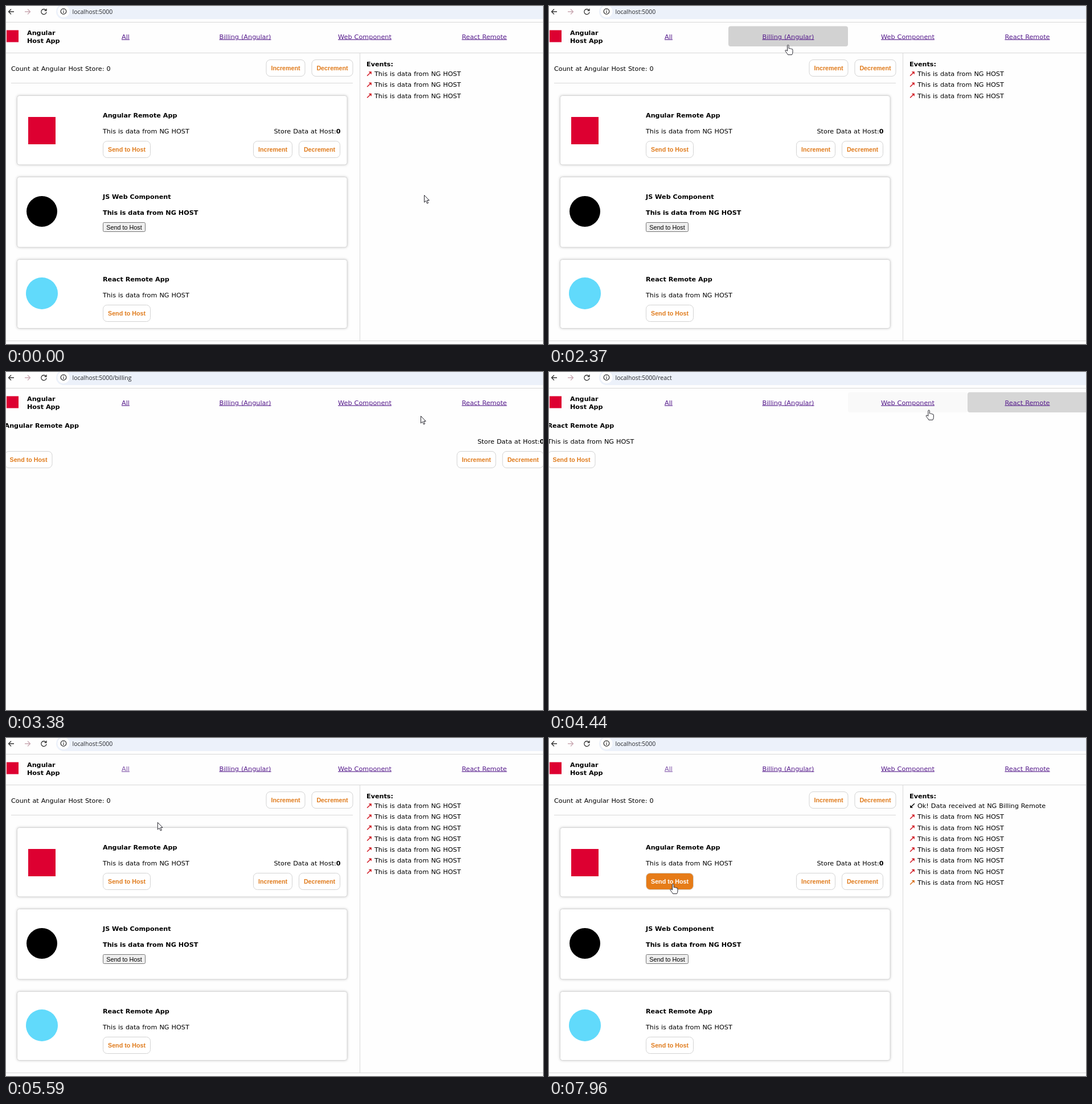
An HTML page for the animation above (8 s loop, 943x594 px).

```html
<!DOCTYPE html>
<html lang="en">
<head>
<meta charset="utf-8">
<title>Host App</title>
<style>
html, body { margin: 0; width: 100%; height: 100%; overflow: hidden; background: #fefefe; }
svg { display: block; width: 943px; height: 594px; }
text { font: 11.25px "DejaVu Sans", sans-serif; word-spacing: .4px; fill: #000; white-space: pre; }
.b { font-weight: bold; font-size: 11.2px; word-spacing: 0; }
.btn { font: bold 10.7px "Liberation Sans", Arial, sans-serif; word-spacing: 0; fill: #e07b1c; text-anchor: middle; }
.plain { font: 10.8px "Liberation Sans", Arial, sans-serif; word-spacing: 0; text-anchor: middle; }
.url { font: 10.5px "Open Sans", sans-serif; word-spacing: 0; fill: #27292d; }
.link { fill: #551a8b; text-anchor: middle; text-decoration: underline; }
.end { text-anchor: end; }
.line { stroke: #d8d8d8; fill: none; }
.icon { fill: none; stroke: #333; stroke-width: 1.3; }
.card { fill: #fff; stroke: #d6d6d6; filter: drop-shadow(0 0 2px rgba(0,0,0,.2)); }
</style>
</head>
<body>
<svg id="stage" viewBox="0 0 943 594" xmlns="http://www.w3.org/2000/svg"></svg>
<script>
const LOOP = 8000;
const FADE = { link: 280, send: 560 };
const CLICK = { billing: 2520, react: 3960, all: 5170, send: 7960 };
const DATA = 'This is data from NG HOST';
const LINKS = ['All', 'Billing (Angular)', 'Web Component', 'React Remote'];
const NAV = { x: 105, y: 35.5, w: 210, h: 35.5 };
const SEND = { x: 170.5, y: 237.5, w: 83, h: 29 };

const text = (x, y, s, cls = '', more = '') =>
  `<text x="${x}" y="${y}" class="${cls}" ${more}>${s}</text>`;
const line = d => `<path class="line" d="${d}"/>`;
const group = (id, body, dx = 0, dy = 0) =>
  `<g id="${id}" transform="translate(${dx} ${dy})">${body}</g>`;
const square = (x, y, size) => `<rect x="${x}" y="${y}" width="${size}" height="${size}" fill="#dd0031"/>`;
const disc = (y, r, fill) => `<circle cx="63" cy="${y}" r="${r}" fill="${fill}"/>`;
const card = (y, h) => `<rect class="card" x="19.5" y="${y}" width="579.5" height="${h}" rx="4"/>`;
const title = (y, s) => text(170, y, s, 'b');

function button(x, y, w, label, id = '') {
  return `<g id="${id}"><rect x="${x}" y="${y}" width="${w}" height="${SEND.h}" rx="7" fill="#fff" stroke="#d3d3d3"/>` +
    text(x + w / 2, y + 18.5, label, 'btn') + '</g>';
}
const pair = (x, y) => button(x, y, 68, 'Increment') + button(x + 80, y, 72, 'Decrement');
const send = (y, id) => button(SEND.x, y, SEND.w, 'Send to Host', id);

const store = text(587.5, 224, 'Store Data at Host:<tspan class="b">0</tspan>', 'end') + pair(434.5, SEND.y);
const reactBody = title(484, 'React Remote App') + text(170, 512, DATA) + send(525.5);
const billingPage = group('', title(196, 'Angular Remote App') + send(SEND.y), -172.5, -98) +
  group('', store, 357.5, -98);

function eventRow(id, row, s, color, turn = 0) {
  return group(id, `<g transform="rotate(${turn})" stroke="${color}" fill="${color}">` +
    '<path d="M-3.8 3.8L2 -2" stroke-width="1.4"/><path d="M-1.2 -3.8H3.8V1.2Z" stroke="none"/></g>' +
    text(9, 4, s), 638, 119 + 19.25 * row);
}

function browserBar() {
  return '<path d="M943 -3H101a13 13 0 0 0 0 26H943z" fill="#ecf1fa"/>' +
    '<circle cx="101" cy="9.5" r="10.5" fill="#fff"/>' +
    '<path class="icon" d="M14 10H5M9 5.5L4.5 10L9 14.5"/>' +
    '<path class="icon" style="stroke:#c9a9b2" d="M33 10H42M38 5.5L42.5 10L38 14.5"/>' +
    '<path class="icon" d="M70 7.2A4.6 4.6 0 1 0 71 10.6M71 4.8V8H67.6"/>' +
    '<circle class="icon" cx="101" cy="9.5" r="4.8"/><path class="icon" d="M101 9V12.3M101 6.5V7.8"/>' +
    text(116.5, 13.5, '', 'url', 'id="url"') + line('M0 28.5H943');
}

function navBar() {
  return square(1, 42.5, 21) + text(37, 51, 'Angular', 'b') + text(37, 65, 'Host App', 'b') +
    LINKS.map((s, i) => {
      const x = NAV.x + NAV.w * i;
      return `<rect id="nav${i}" x="${x}" y="${NAV.y}" width="${NAV.w}" height="${NAV.h}" rx="4" fill="#d2d2d2"/>` +
        text(x + NAV.w / 2, 57.5, s, 'link', `id="link${i}"`);
    }).join('');
}

function homePage() {
  const rows = Array.from({ length: 8 }, (_, i) => eventRow('ev' + i, i, DATA, i < 7 ? '#d0101c' : '#d86f18'));
  return line('M0 82.5H943M621.5 83V588M0 588.5H943M9 135.5H609') +
    text(9, 114, 'Count at Angular Host Store: 0') + pair(457, 94.5) +
    card(157.5, 121.5) + square(39, 195, 48) +
    title(196, 'Angular Remote App') + text(170, 224, DATA) + store + send(SEND.y, 'send') +
    card(300.5, 123.5) + disc(361, 27, '#000') + title(339, 'JS Web Component') + title(367, DATA) +
    '<rect x="170.5" y="380.5" width="74" height="16" rx="2" fill="#efefef" stroke="#767676"/>' +
    text(207.5, 392.5, 'Send to Host', 'plain') +
    card(445.5, 121) + disc(505, 28, '#61dafb') + reactBody +
    text(633, 105.5, 'Events:', 'b') + rows.join('') +
    eventRow('reply', 0, 'Ok! Data received at NG Billing Remote', '#000', 180);
}

const cursor = '<g id="cursor" fill="#fff" stroke="#26262e" stroke-linejoin="round">' +
  '<path id="arrow" d="M.5 .5V13L3.4 10.3L5.5 15L7.5 14.1L5.5 9.5H9.2Z"/>' +
  '<path id="hand" d="M-1.5 11V1.8Q-1.5 .5 -.3 .5T1 1.8V6.5Q2.2 5.6 3.3 7Q4.5 6.2 5.6 7.5Q8 7 8 9.5V13Q8 15.5 6.5 17.7H-.5Q-1.5 15.5 -4 12.8Q-5.8 10.2 -4.8 9.7Q-3.3 9 -1.5 11Z"/></g>';

const $ = id => document.getElementById(id);
$('stage').innerHTML = browserBar() + navBar() + group('home', homePage()) +
  group('billing', billingPage) + group('react', reactBody, -172.5, -386) + cursor;

// each move: begins, ends, stops at x, y, sags by
const START = [734, 332];
const MOVES = [
  [200, 990, 525, 117, 0],
  [1020, 1830, 430, 75, 64],
  [1860, 1960, 420, 68, 0],
  [2560, 3300, 728, 77, 30],
  [3380, 3900, 830, 66, 0],
  [4260, 4790, 228, 68, 0],
  [5180, 5730, 273, 163, 0],
  [5840, 6350, 332, 380, 0],
  [6560, 6890, 273, 284, 0],
  [6960, 7370, 218, 256, 0]
];

const ease = (t, from = 0, to = 1) => {
  const p = Math.min(1, Math.max(0, (t - from) / (to - from)));
  return p * p * (3 - 2 * p);
};
const mix = (a, b, p) => `rgb(${a.map((v, i) => Math.round(v + (b[i] - v) * p))})`;
const show = (id, on) => $(id).setAttribute('display', on ? 'inline' : 'none');

function pointer(t) {
  let [x, y] = START;
  for (const [from, to, x1, y1, sag] of MOVES) {
    const p = ease(t, from, to);
    x += (x1 - x) * p;
    y += (y1 - y) * p + 4 * sag * p * (1 - p);
    if (p < 1) break;
  }
  return [x, y];
}

const inside = ([x, y], box) => x > box.x && x < box.x + box.w && y > box.y && y < box.y + box.h;

// share of the last `span` ms that the pointer spent in the box
function glow(t, box, span) {
  const n = 20;
  let hits = 0;
  for (let i = 0; i < n; i++) hits += inside(pointer(t - span * i / n), box);
  return ease(hits / n);
}

function render(t) {
  const page = t < CLICK.billing || t >= CLICK.all ? 'home' : t < CLICK.react ? 'billing' : 'react';
  ['home', 'billing', 'react'].forEach(p => show(p, p === page));
  $('url').textContent = 'localhost:5000' + (page === 'home' ? '' : '/' + page);

  const boxes = LINKS.map((_, i) => ({ ...NAV, x: NAV.x + NAV.w * i }));
  boxes.forEach((box, i) => $('nav' + i).setAttribute('opacity', glow(t, box, FADE.link)));
  $('link0').setAttribute('opacity', t >= CLICK.all ? .75 : 1);

  const sent = t >= CLICK.send;
  const count = t < CLICK.all ? 3 : sent ? 8 : 7;
  for (let i = 0; i < 8; i++) show('ev' + i, i < count && !(sent && i === 0));
  show('reply', sent);

  const hot = glow(t, SEND, FADE.send);
  const [face, label] = $('send').children;
  face.setAttribute('fill', mix([255, 255, 255], [230, 124, 24], hot));
  label.style.fill = mix([224, 123, 28], [255, 255, 255], hot);

  const pos = pointer(t);
  const onHand = [...boxes, SEND].some(box => inside(pos, box));
  show('hand', onHand);
  show('arrow', !onHand);
  $('cursor').setAttribute('transform', `translate(${pos})`);
}

function tick() {
  render(performance.now() % LOOP);
  requestAnimationFrame(tick);
}
tick();
</script>
</body>
</html>
```
